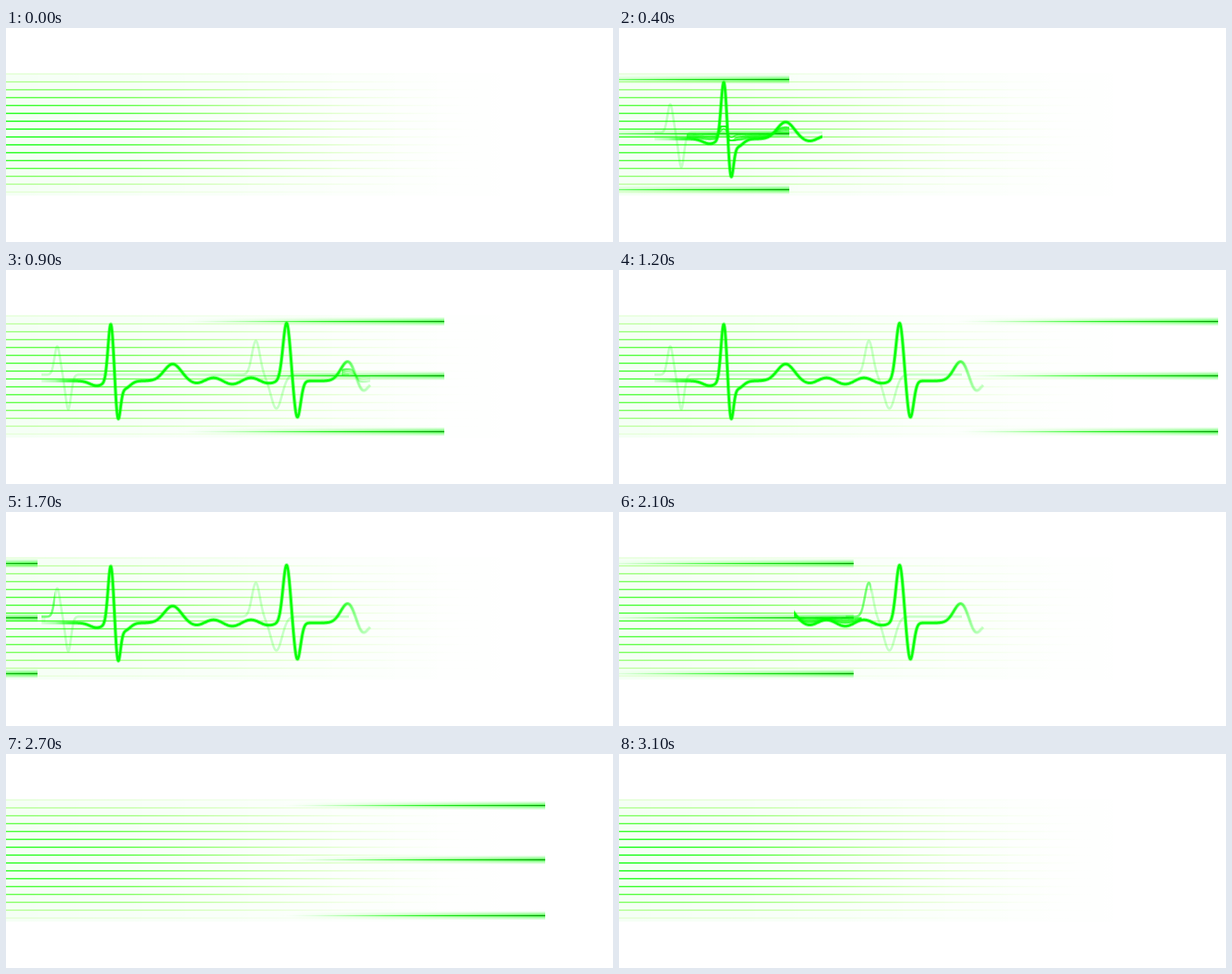
An HTML page with a canvas that plays this animation: 770 by 272 pixels, repeating every 3.2 s.

```html
<!DOCTYPE html>
<html lang="en">
<head>
<meta charset="utf-8">
<title>Pulse</title>
<style>
  html, body { margin: 0; width: 100%; height: 100%; overflow: hidden; background: #fff; }
  canvas { display: block; }
</style>
</head>
<body>
<canvas id="stage" width="770" height="272"></canvas>
<script>
const W = 770, H = 272, STEP = 100, STEPS = 32;
const TOP = 57, BAND = 156, MID = 134, REACH = 640, TAIL = 340;
const ctx = document.getElementById('stage').getContext('2d');

const clamp = v => Math.min(1, Math.max(0, v));
const smooth = (a, b, x) => {
  const t = clamp((x - a) / (b - a));
  return t * t * (3 - 2 * t);
};
const bump = (x, center, width, height) => height * Math.exp(-(((x - center) / width) ** 2));
const green = (a, r = 0, g = 255) => `rgba(${Math.round(r)},${Math.round(g)},0,${a.toFixed(3)})`;

function beat(x) {
  const ripple = 4 * Math.cos((x - 287) / 48 * 2 * Math.PI) * Math.exp(-(((x - 287) / 62) ** 4));
  const first = bump(x, 115, 12, 6) + bump(x, 133, 5, -74) + bump(x, 142, 4.5, 45)
    + bump(x, 150, 10, 10) + bump(x, 211, 15, -21);
  const second = bump(x, 356, 6.5, -73) + bump(x, 369.5, 6, 47)
    + bump(x, 434, 13, -25) + bump(x, 452, 10, 15);
  return 141 + ripple + first + second;
}

function echo(x) {
  return 133 + bump(x, 65, 5, -36) + bump(x, 79, 5, 44)
    + bump(x, 317, 7, -43) + bump(x, 343, 10, 43);
}

// Horizontal gradient sampled from a colour rule, u running 0 to 1
function ramp(x0, x1, rule) {
  const g = ctx.createLinearGradient(x0, 0, x1, 0), n = 24;
  for (let i = 0; i <= n; i++) g.addColorStop(i / n, rule(i / n));
  return g;
}

const fade = ramp(45, 460, u => {
  const x = 45 + 415 * u;
  return green((0.1 + 0.9 * smooth(50, 95, x)) * (1 - 0.82 * smooth(415, 455, x)));
});

function stroke(rule, from, to, width, alpha, style) {
  ctx.globalAlpha = alpha;
  ctx.strokeStyle = style;
  ctx.lineWidth = width;
  ctx.beginPath();
  for (let x = from; x <= to; x += 0.5) ctx.lineTo(x, rule(x));
  ctx.stroke();
  ctx.globalAlpha = 1;
}

function within(x0, x1, draw) {
  if (x1 <= x0) return;
  ctx.save();
  ctx.beginPath();
  ctx.rect(x0, 0, x1 - x0, H);
  ctx.clip();
  draw();
  ctx.restore();
}

function rows(power) {
  ctx.fillStyle = ramp(0, REACH, u => green(0.04 * (1 - u)));
  ctx.fillRect(0, TOP, REACH, BAND);
  for (let y = 58; y <= 208; y += 10) {
    const level = power * (1 - Math.abs((y - 133) / 79) ** 2.6);
    ctx.fillStyle = ramp(0, REACH, u => {
      const v = level * (0.5 + 0.5 * Math.cos(Math.PI * u)) ** 1.3;
      return green(v, 130 * (1 - v));
    });
    ctx.fillRect(0, y, REACH, 1);
    ctx.globalAlpha = 0.25;
    ctx.fillRect(0, y - 1, REACH, 3);
    ctx.globalAlpha = 1;
  }
}

function beam(head) {
  const tail = head - TAIL, strength = clamp(1 - (head - W) / 150);
  const glow = ramp(tail, head, u => green(u ** 1.5, 60 * (1 - u)));
  const core = ramp(tail, head, u => green(smooth(0, 0.7, u), 0, 255 - 125 * u ** 3));
  for (const y of [65, MID, 205]) {
    ctx.fillStyle = glow;
    for (let size = 3; size <= 11; size += 2) {
      ctx.globalAlpha = strength / size;
      ctx.fillRect(tail, y + 0.5 - size / 2, TAIL, size);
    }
    ctx.globalAlpha = strength;
    ctx.fillStyle = core;
    ctx.fillRect(tail, y, TAIL, 1);
  }
  ctx.globalAlpha = 1;
}

function trace(from, to) {
  within(from, to, () => {
    stroke(echo, 45, 435, 3, 0.2, green(1));
    stroke(beat, 45, 462, 5.2, 0.32, fade);
    stroke(beat, 45, 462, 3, 0.95, fade);
  });
}

// Flattened copies of the beat, gathered around the middle line
function bundle(from, to) {
  within(from, to, () => {
    for (let k = 0.1; k < 1; k += 0.2)
      stroke(x => MID + 9 * Math.tanh((beat(x) - MID) * k / 9), 45, 462, 1.8, 0.6, fade);
  });
}

function draw(n) {
  const rising = n < 17;
  const head = rising ? 12 + 68 * (n - 1) : 40 + 64.4 * (n - 17);
  const power = rising ? Math.max(0.82, 1 - 0.03 * n) : 0.82 + 0.18 * smooth(23, 30, n);

  ctx.fillStyle = '#fff';
  ctx.fillRect(0, 0, W, H);
  rows(power);
  if (n === 0) return;
  beam(head);

  if (rising) {
    trace(0, head + 42);
    bundle(head - 130, head);
  } else {
    const cut = 222 + 70.7 * (n - 21);
    trace(cut, W);
    bundle(cut, head + 10);
    within(Math.max(cut, head - 10), head + 22, () => stroke(echo, 45, 435, 2.8, 0.4, green(1)));
  }
}

ctx.lineJoin = 'round';
const start = performance.now();
let shown = -1;
function tick() {
  const n = Math.floor(Math.max(0, performance.now() - start) / STEP) % STEPS;
  if (n !== shown) draw(shown = n);
  requestAnimationFrame(tick);
}
tick();
</script>
</body>
</html>
```
